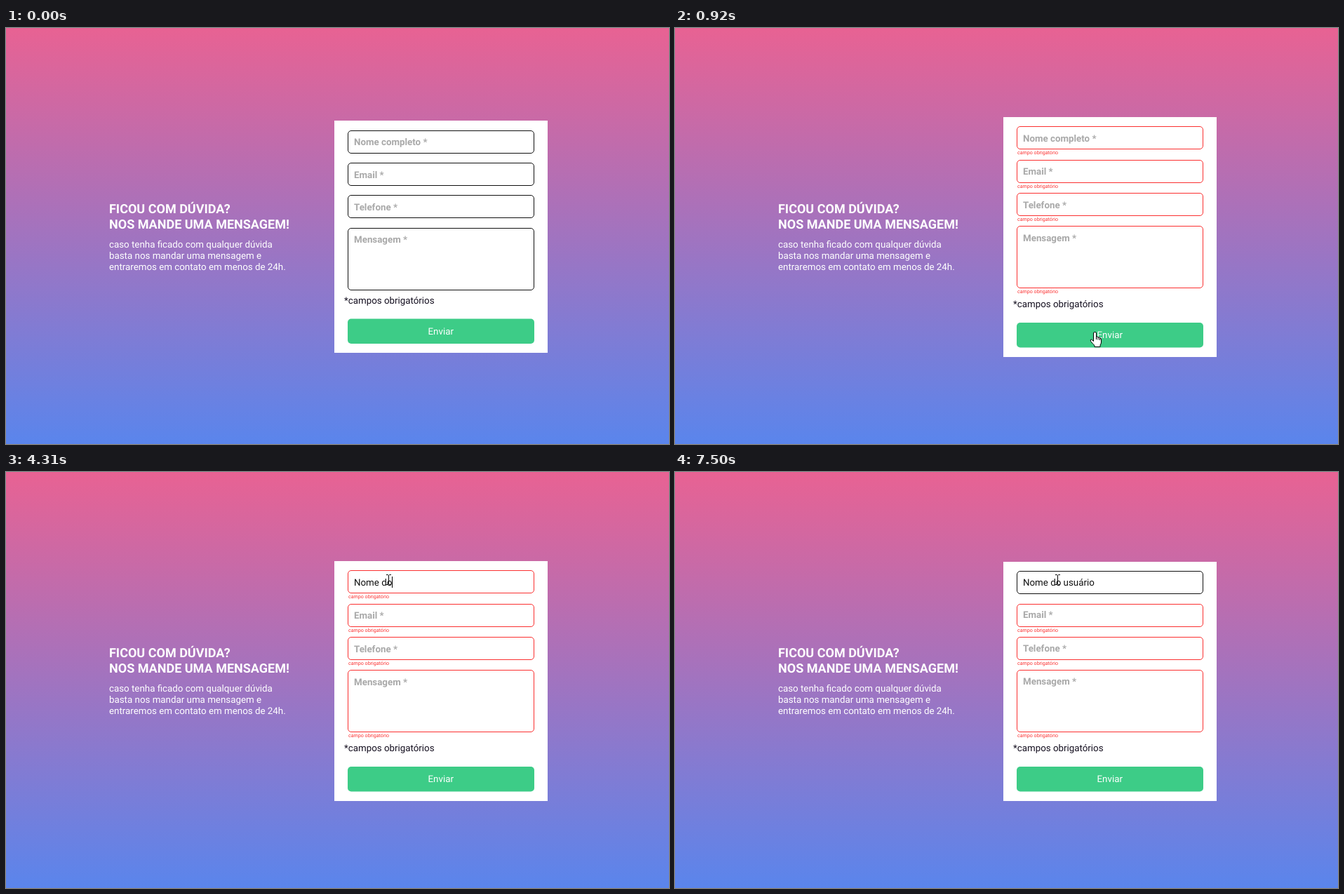
Animation, 945 px wide and 593 px high, one loop 8 s. Source, as an HTML page with a canvas:

```html
<!DOCTYPE html>
<html lang="pt-BR">
<head>
<meta charset="utf-8">
<style>
  html, body { margin: 0; width: 100%; height: 100%; overflow: hidden; }
  canvas { display: block; }
</style>
</head>
<body>
<canvas id="stage" width="945" height="593"></canvas>
<script>
const ctx = document.getElementById('stage').getContext('2d');
const LOOP = 8000, SIZE = 13.333, BLINK = 530;
const SUBMIT = 920, FOCUS = 1720, NEXT_FIELD = 6970;
const TYPED = 'Nome do usuário';
const KEYS = [2650, 2980, 3640, 3770, 3970, 4170, 4310, 4640, 5040, 5440, 5570, 6100, 6230, 6370, 6500];
const LABELS = ['Nome completo *', 'Email *', 'Telefone *', 'Mensagem *'];
const RED = '#fb3030';

// Form geometry: card edges, box tops, text baselines, note and button
const LAYOUTS = {
  clean:   { top: 132, bottom: 463, boxes: [146, 192, 238, 285], text: [167, 214, 260, 306], note: 393, button: 414.5 },
  invalid: { top: 127, bottom: 469, boxes: [140, 188, 235, 282], text: [162, 209, 257, 304], note: 398, button: 420 },
  partial: { top: 128, bottom: 469, boxes: [141, 188, 235, 282], text: [162, 208, 256, 303], note: 398, button: 420 }
};

const HAND = new Path2D('M-.5 2Q-.5 .5 1.5 .5Q3.5 .5 3.5 2V7Q5.5 6.3 6 8Q8 7.3 8.5 9Q10.5 8.5 10.5 11V15Q10.5 17 9 19V21.5H1V19.5Q-1 18-4.5 13.5Q-5.5 11-3.5 11L-.5 13.5Z');
const HAND_LINES = new Path2D('M3.5 7V11M6 8V11.5M8.5 9V12');
const ARROW = new Path2D('M.5 .5V16L4 12.7L6.6 18.4L9 17.4L6.5 12H11.3Z');
const IBEAM = new Path2D('M-1 -6.5H1.5L2.5 -5.5L3.5 -6.5H6M2.5 -6V7M-1 7.5H1.5L2.5 6.5L3.5 7.5H6');

function text(str, x, y, color, weight = 400, size = SIZE) {
  ctx.font = `${weight} ${size}px Roboto, sans-serif`;
  ctx.fillStyle = color;
  ctx.fillText(str, x, y);
}

function roundBox(x, y, w, h, r) {
  ctx.beginPath();
  ctx.roundRect(x, y, w, h, r);
}

function drawBackground() {
  const sky = ctx.createLinearGradient(0, 0, 0, 593);
  sky.addColorStop(0, '#e86293');
  sky.addColorStop(1, '#5a85ec');
  ctx.fillStyle = sky;
  ctx.fillRect(0, 0, 945, 593);
  text('FICOU COM DÚVIDA?', 147, 264, '#fff', 700, 18);
  text('NOS MANDE UMA MENSAGEM!', 147, 286, '#fff', 700, 18);
  ['caso tenha ficado com qualquer dúvida',
   'basta nos mandar uma mensagem e',
   'entraremos em contato em menos de 24h.'
  ].forEach((line, i) => text(line, 147, 313 + 16 * i, '#fff'));
}

function drawForm(t) {
  const form = t < SUBMIT ? LAYOUTS.clean : t < NEXT_FIELD ? LAYOUTS.invalid : LAYOUTS.partial;
  const value = TYPED.slice(0, KEYS.filter(k => k <= t).length);
  ctx.fillStyle = '#fff';
  ctx.fillRect(468, form.top, 304, form.bottom - form.top);

  LABELS.forEach((label, i) => {
    const y = form.boxes[i], h = i === 3 ? 89 : 33;
    const error = t >= SUBMIT && !(i === 0 && t >= NEXT_FIELD);
    roundBox(487.5, y + .5, 265, h - 1, 4.5);
    ctx.strokeStyle = error ? RED : '#111';
    ctx.lineWidth = 1;
    ctx.stroke();
    if (error) text('campo obrigatório', 488, y + h + 7, RED, 400, 7.1);
    if (i === 0 && value) text(value, 496, form.text[i], '#111');
    else text(label, 496, form.text[i], '#a9a9a9', 700);
  });

  text('*campos obrigatórios', 482, form.note, '#151020');
  roundBox(487, form.button, 266, 35.5, 5);
  ctx.fillStyle = '#3dcc87';
  ctx.fill();
  text('Enviar', 601.5, form.button < 415 ? 437 : 442, '#fff');
  drawCaret(t, value);
}

// The caret restarts its blink at every key press or focus change
function drawCaret(t, value) {
  if (t < FOCUS) return;
  const last = Math.max(...[FOCUS, ...KEYS, NEXT_FIELD].filter(k => k <= t));
  if (Math.floor((t - last) / BLINK) % 2) return;
  const inEmail = t >= NEXT_FIELD;
  ctx.font = `400 ${SIZE}px Roboto, sans-serif`;
  const x = inEmail ? 496 : Math.round(495.9 + ctx.measureText(value).width);
  ctx.fillStyle = '#000';
  ctx.fillRect(x, inEmail ? 196 : 149, 1, 16);
}

const ease = u => u * u * (3 - 2 * u);
const clamp = u => Math.min(1, Math.max(0, u));
const bezier = (a, b, c, u) => (1 - u) * (1 - u) * a + 2 * u * (1 - u) * b + u * u * c;

function pointerAt(t) {
  if (t < 1060) {
    const u = ease(clamp(Math.floor((t - 260) / 66.6) / 6));
    return [660 - 63 * u, 529 - 96 * u];
  }
  const u = ease(clamp((Math.floor((t - 1060) / 65) + 1) / 7));
  return [bezier(597, 497, 543, u), bezier(433, 235, 153, u)];
}

function drawPointer(t) {
  if (t < 260) return;
  const [x, y] = pointerAt(t).map(Math.round);
  const form = t < SUBMIT ? LAYOUTS.clean : LAYOUTS.invalid;
  const inside = (top, h) => x > 487 && x < 753 && y >= top && y <= top + h;

  if ((t >= 860 && t < SUBMIT) || (t >= FOCUS && t < 1850)) {
    ctx.beginPath();
    ctx.arc(x, y, 11, 0, 2 * Math.PI);
    ctx.fillStyle = 'rgba(180, 232, 28, .75)';
    ctx.fill();
  }

  ctx.save();
  ctx.translate(x, y);
  ctx.strokeStyle = '#000';
  ctx.fillStyle = '#fff';
  ctx.lineWidth = 1;
  if (form.boxes.some((top, i) => inside(top, i === 3 ? 89 : 33))) {
    ctx.stroke(IBEAM);
  } else {
    const hand = inside(form.button, 35.5);
    const shape = hand ? HAND : ARROW;
    ctx.fill(shape);
    ctx.stroke(shape);
    if (hand) ctx.stroke(HAND_LINES);
  }
  ctx.restore();
}

function frame() {
  const t = performance.now() % LOOP;
  ctx.textRendering = 'geometricPrecision';
  drawBackground();
  drawForm(t);
  drawPointer(t);
  requestAnimationFrame(frame);
}
frame();
</script>
</body>
</html>
```
